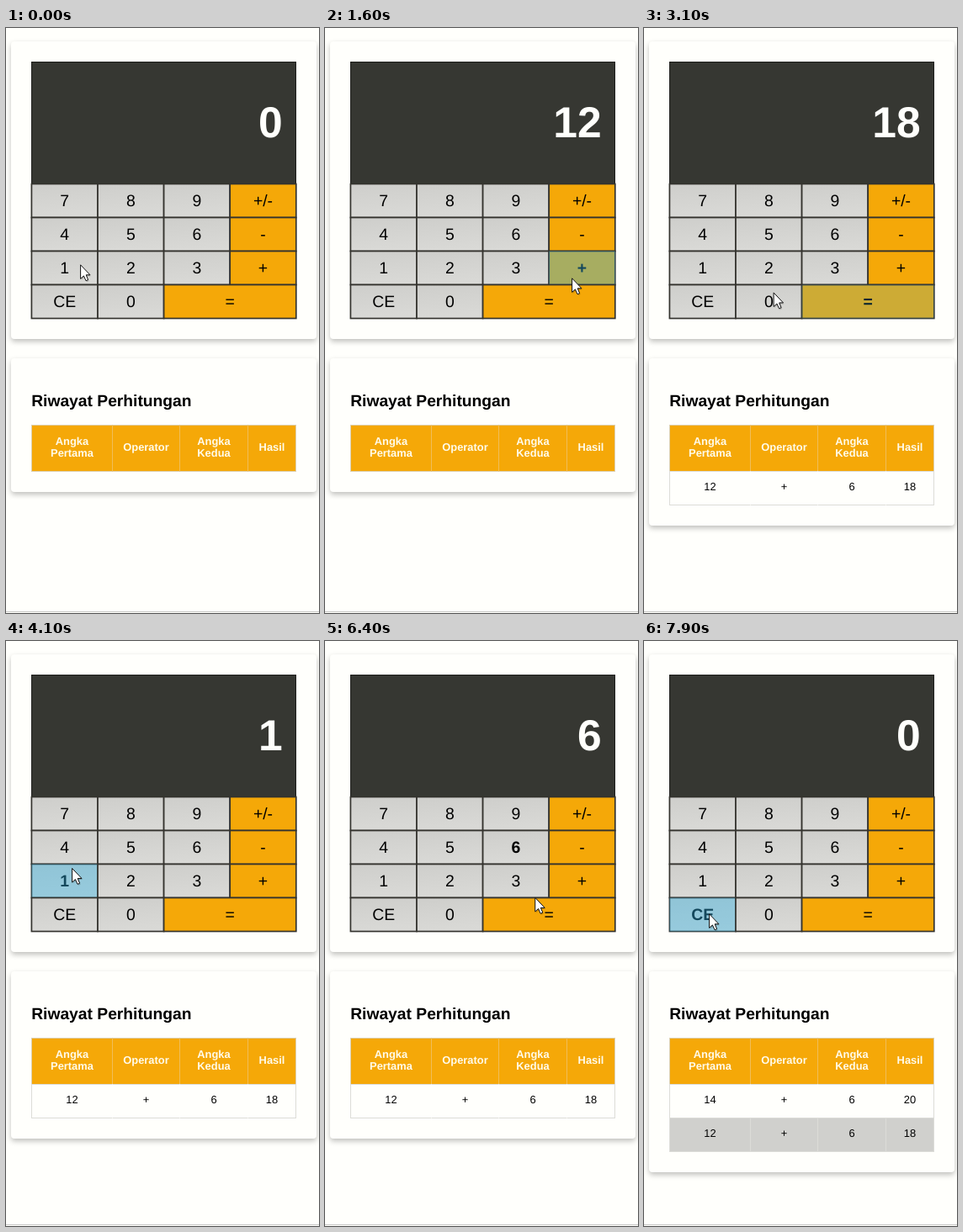
Recreate the animation shown at these times as an HTML page. Size 372 by 696 pixels, loop 8000 ms.

```html
<!DOCTYPE html>
<html lang="id">
<head>
<meta charset="utf-8">
<title>Kalkulator</title>
<style>
  html, body { margin: 0; width: 100%; height: 100%; overflow: hidden; background: #fffffc; }
  .card {
    position: absolute; left: 6px; width: 363px; border-radius: 4px;
    background: #fffffc; box-shadow: 0 3px 6px rgba(0, 0, 0, .25);
  }
  #calc { top: 15.5px; height: 354px; }
  #history { top: 393px; }
  svg { position: absolute; left: 0; top: 0; }
  text {
    font-family: "Liberation Sans", Arial, sans-serif; text-rendering: geometricPrecision;
    text-anchor: middle; fill: #000;
  }
  .key { font-size: 19.4px; }
  .cell { font-size: 12.9px; }
  .head { font-size: 12.9px; font-weight: bold; fill: #fffbea; }
  #title { font-size: 19.25px; font-weight: bold; text-anchor: start; }
  #screen { font-size: 51.6px; font-weight: bold; text-anchor: end; fill: #fffffc; }
</style>
</head>
<body>
<div class="card" id="calc"></div>
<div class="card" id="history"></div>
<svg id="stage" width="372" height="696" viewBox="0 0 372 696">
  <defs>
    <linearGradient id="grey" x1="0" y1="0" x2=".15" y2="1">
      <stop offset="0" stop-color="#cececb"/>
      <stop offset="1" stop-color="#d9d9d6"/>
    </linearGradient>
  </defs>
</svg>
<script>
const LOOP = 8000, STEP = 100, TRAVEL = 400;
const stage = document.getElementById('stage');
const historyCard = document.getElementById('history');

function add(tag, attrs, text = '', parent = stage) {
  const el = document.createElementNS('http://www.w3.org/2000/svg', tag);
  for (const name in attrs) el.setAttribute(name, attrs[name]);
  el.textContent = text;
  return parent.appendChild(el);
}
const rect = (x, y, width, height, fill, more, parent) =>
  add('rect', { x, y, width, height, fill, ...more }, '', parent);
const label = (text, x, y, cls, parent) => add('text', { x, y, class: cls }, text, parent);

// Display
rect(30.5, 40.5, 314, 145, '#363732', { stroke: '#1c1c1a' });
const screen = add('text', { id: 'screen', x: 328.6, y: 130 });

// Keypad
const COL = 78.6, ROW = 40, LEFT = 30.4, TOP = 185.5;
const keys = {};
const layout = [['7', '8', '9', '+/-'], ['4', '5', '6', '-'], ['1', '2', '3', '+'], ['CE', '0', '=']];
layout.forEach((row, r) => row.forEach((name, c) => {
  const x = LEFT + c * COL, y = TOP + r * ROW, w = name === '=' ? COL * 2 : COL;
  const orange = c === 3 || name === '=';
  rect(x, y, w, ROW, orange ? '#f5a808' : 'url(#grey)', { stroke: '#34332e', 'stroke-width': 1.7 });
  const text = label(name, x + w / 2, y + 26, 'key');
  const glow = rect(x, y, w, ROW, '#33b5e5', { opacity: 0 });
  keys[name] = { text, glow };
}));

// History table
const EDGES = [30.5, 126.5, 206.5, 287.5, 344.5];
const MIDS = EDGES.slice(1).map((x, i) => (x + EDGES[i]) / 2);
add('text', { id: 'title', x: 30.2, y: 450 }, 'Riwayat Perhitungan');

function tableRow(y, h, fill, line, frame, parent) {
  rect(30.5, y, 314, h, fill, { stroke: frame }, parent);
  EDGES.slice(1, 4).forEach(x => rect(x - .5, y, 1, h, line, {}, parent));
}
tableRow(472.5, 55, '#f5a808', '#f0bd58', '#dccfae');
[['Angka', 'Pertama'], ['Operator'], ['Angka', 'Kedua'], ['Hasil']].forEach((lines, i) =>
  lines.forEach((line, n) =>
    label(line, MIDS[i], 503.3 + (n - (lines.length - 1) / 2) * 14, 'head')));

const bodyRows = ['#fffffc', '#d0d0cd'].map((fill, n) => {
  const group = add('g', {}), y = 527.5 + n * ROW;
  tableRow(y, ROW, fill, n ? '#dcdcd8' : fill, '#dcdcd8', group);
  const cells = MIDS.map(x => label('', x, y + 22.6, 'cell', group));
  return { group, cells };
});

rect(0, 694, 372, 1, '#c9c9c7');

// Pointer
const pointer = add('g', {});
const arrow = 'M.6 .8V17.4L4.4 13.9L7 19.7L9.6 18.5L7.2 12.8H12Z';
add('path', { d: arrow, fill: '#000', opacity: .2, transform: 'translate(1 1.5)' }, '', pointer);
add('path', { d: arrow, fill: '#fff', stroke: '#111', 'stroke-linejoin': 'round' }, '', pointer);

// The pointer leaves for (x, y), then taps the key there.
const tap = (key, leave, at, x, y) => ({ key, leave, at, x, y });
const taps = [
  tap('1', -TRAVEL, 500, 88, 281),
  tap('2', 600, 900, 132, 277),
  tap('+', 1000, 1600, 293, 297),
  tap('6', 1900, 2300, 216, 245),
  tap('=', 2400, 2900, 257, 317),
  tap('CE', 3000, 3700, 78, 312),
  tap('1', 3800, 4100, 78, 269),
  tap('4', 4400, 4800, 70, 246),
  tap('+', 5000, 5500, 290, 272),
  tap('6', 5700, 6000, 217, 245),
  tap('=', 6240, 6900, 258, 321),
  tap('CE', 7100, 7800, 77, 324)
];

function calculate(pressed) {
  let shown = '0', first = '', fresh = true;
  const results = [];
  for (const key of pressed) {
    if (key >= '0' && key <= '9') {
      shown = fresh ? key : shown + key;
      fresh = false;
      continue;
    }
    fresh = true;
    if (key === '+') first = shown;
    if (key === 'CE') shown = '0';
    if (key === '=') {
      const sum = String(+first + +shown);
      results.unshift([first, '+', shown, sum]);
      shown = sum;
    }
  }
  return { shown, results };
}

function pointerAt(t) {
  const i = taps.filter(p => p.leave <= t).length - 1;
  const to = taps[i], from = taps[i - 1] || to;
  const k = 1 - (1 - Math.min(1, (t - to.leave) / TRAVEL)) ** 3;
  return [from.x + (to.x - from.x) * k, from.y + (to.y - from.y) * k];
}

// Full for a moment, then a quick fade that ends within 400 ms.
const glowLevel = age => age < 200 ? 1 : Math.max(0, 1 - (age - 100) / 220) ** 1.1;

function render(t) {
  const done = taps.filter(p => p.at <= t);
  const last = done[done.length - 1];
  const { shown, results } = calculate(done.map(p => p.key));
  screen.textContent = shown;

  for (const name in keys) {
    const { text, glow } = keys[name];
    const active = last && last.key === name;
    text.style.fontWeight = active ? 'bold' : 'normal';
    glow.setAttribute('opacity', active ? .4 * glowLevel(t - last.at) : 0);
  }

  bodyRows.forEach(({ group, cells }, n) => {
    group.style.display = results[n] ? '' : 'none';
    cells.forEach((cell, i) => cell.textContent = results[n] ? results[n][i] : '');
  });
  historyCard.style.height = 159 + ROW * results.length + 'px';

  pointer.setAttribute('transform', `translate(${pointerAt(t)})`);
}

const start = performance.now();
function tick() {
  const t = (performance.now() - start) % LOOP;
  render(Math.floor(t / STEP) * STEP);
  requestAnimationFrame(tick);
}
tick();
</script>
</body>
</html>
```
